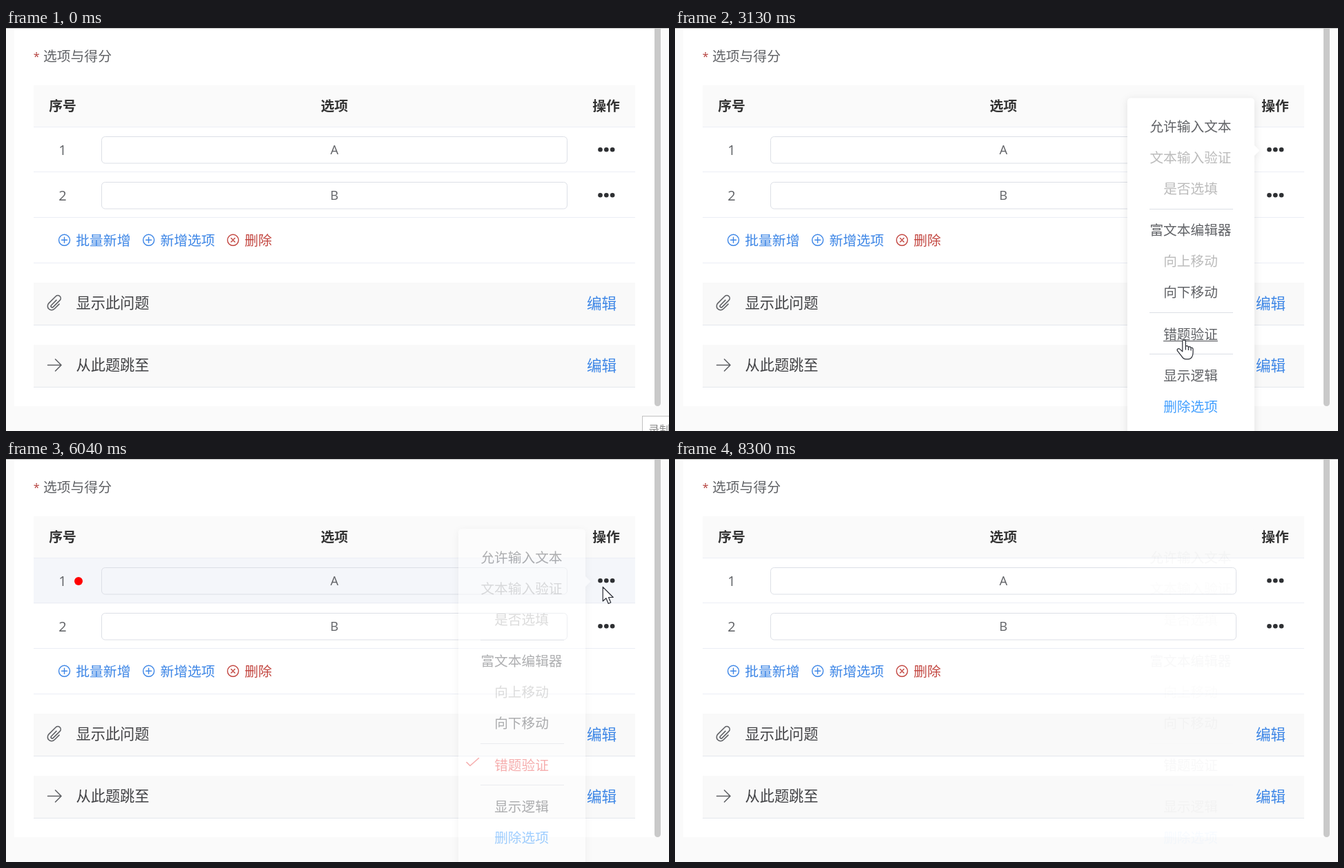
Recreate the animation shown at these times as an HTML page. Size 960 by 584 pixels, loop 8970 ms.

```html
<!DOCTYPE html>
<html lang="zh-CN">
<head>
<meta charset="utf-8">
<title>选项与得分</title>
<style>
  html, body { margin: 0; width: 100%; height: 100%; overflow: hidden; background: #fafafa; }
  svg { display: block; }
  text { font-family: "Noto Sans CJK SC", "Noto Sans CJK", sans-serif; }
  .latin { font-family: "Open Sans", "Noto Sans", sans-serif; }
  .middle { text-anchor: middle; }
  .line { fill: none; stroke-linecap: round; stroke-linejoin: round; }
  .pointer { fill: #fff; stroke: #2b2e36; stroke-width: 1.2; stroke-linejoin: round; }
  .panel { filter: drop-shadow(0 2px 6px rgba(0, 0, 0, .1)); }
</style>
</head>
<body>
<svg id="stage" width="960" height="584" viewBox="0 0 960 584"></svg>
<script>
const LOOP = 8970, STEP = 70, TINT_FADE = 150, MENU_FADE = 280;
const BLUE = '#3d86e6', RED = '#c2453f', INK = '#606266', CHECKED = '#ee5f5f';
const stage = document.getElementById('stage');

function add(parent, tag, attrs, content) {
  const el = document.createElementNS('http://www.w3.org/2000/svg', tag);
  for (const key in attrs) el.setAttribute(key, attrs[key]);
  if (content) el.textContent = content;
  return parent.appendChild(el);
}
const rect = (parent, x, y, width, height, fill, more) =>
  add(parent, 'rect', { x, y, width, height, fill, ...more });
const path = (parent, d, stroke, width = 1.5, more) =>
  add(parent, 'path', { d, stroke, 'stroke-width': width, class: 'line', ...more });
const circle = (parent, cx, cy, r, fill, more) =>
  add(parent, 'circle', { cx, cy, r, fill, ...more });
// Places a line of text by its vertical centre.
const label = (parent, x, cy, content, size, fill, more) =>
  add(parent, 'text', { x, y: cy + size * .37, 'font-size': size, fill, ...more }, content);
const show = (el, visible) => el.setAttribute('visibility', visible ? 'visible' : 'hidden');

// Page and table
rect(stage, 12, 0, 927, 548, '#fff');
rect(stage, 939, -10, 9, 558, '#c9c9c9', { rx: 4.5 });
rect(stage, 0, 0, 960, 1, '#c4c4c4');
label(stage, 39.8, 41, '*', 16, '#b5423e', { class: 'latin' });
label(stage, 54, 41, '选项与得分', 19.8, INK);

rect(stage, 40, 83, 871, 60, '#fafafa');
for (const [name, x] of [['序号', 82], ['选项', 475.5], ['操作', 869]])
  label(stage, x, 113, name, 19.8, '#333', { class: 'middle', 'font-weight': 700 });

const rows = ['A', 'B'].map((option, i) => {
  const top = 144 + 66 * i;
  const tint = rect(stage, 40, top, 871, 65.5, '#f4f6fa', { opacity: 0 });
  rect(stage, 138.5, top + 13.5, 674, 38.5, 'none', { rx: 5, stroke: '#dcdfe6' });
  label(stage, 82, top + 32.3, i + 1, 20, INK, { class: 'latin middle' });
  label(stage, 475.5, top + 32, option, 18.3, INK, { class: 'latin middle' });
  for (const side of [-1, 0, 1]) circle(stage, 869.3 + 8.8 * side, top + 32.2, 3.3, '#2e3033');
  return { top, tint };
});
for (let i = 0; i < 4; i++) rect(stage, 40, Math.floor(143 + 65.8 * i), 871, 1, '#ebeef5');
const redDot = circle(stage, 105, 177, 6, '#f00');

['批量新增', '新增选项', '删除'].forEach((name, i) => {
  const x = 84.5 + 122.1 * i, color = i < 2 ? BLUE : RED;
  const cross = i < 2 ? 'm-4 0h8m-4-4v8' : 'm-2.7-2.7 5.4 5.4m0-5.4-5.4 5.4';
  circle(stage, x, 307.3, 8, 'none', { stroke: color, 'stroke-width': 1.4 });
  path(stage, `M${x} 307.3${cross}`, color, 1.4);
  label(stage, x + 16.8, 308, name, 19.8, color);
});

['显示此问题', '从此题跳至'].forEach((name, i) => {
  const top = 369 + 90 * i;
  rect(stage, 40, top, 871, 61, '#f9f9f9');
  rect(stage, 40, top + 61, 871, 1, '#e4e7ed');
  label(stage, 101.5, top + 29.5, name, 21.2, '#404144');
  label(stage, 841, top + 30.5, '编辑', 21.6, BLUE);
});
path(stage, 'M5-3V5.5a5 5 0 0 1-10 0V-7a3.6 3.6 0 0 1 7.2 0V5a1.6 1.6 0 0 1-3.2 0V-4', INK, 1.4,
  { transform: 'translate(70.5 398.5) rotate(45) scale(1.15)' });
path(stage, 'M60.5 488.5H80M71.5 480 80 488.5 71.5 497', INK, 1.6);

const corner = add(stage, 'g', {});
rect(corner, 921.5, 562.5, 60, 40, '#fff', { stroke: '#c2c2c2' });
label(corner, 930.5, 582, '录制', 15.5, '#888');

// Popover menu
const menu = add(stage, 'g', {});
const panel = add(menu, 'g', { class: 'panel' });
rect(panel, 655, 101.5, 184, 520, '#fff', { rx: 5 });
add(panel, 'path', { d: 'M838 169 846.5 177.5 838 186Z', fill: '#fff' });

const groups = ['允许输入文本 文本输入验证 是否选填', '富文本编辑器 向上移动 向下移动', '错题验证', '显示逻辑 删除选项'];
const disabled = ['文本输入验证', '是否选填', '向上移动'];
const items = {};
let itemY = 143;
groups.forEach((group, i) => {
  if (i) {
    rect(menu, 687, Math.round(itemY - 16.5), 121, 1, '#dcdfe6');
    itemY += 15.1;
  }
  for (const name of group.split(' ')) {
    const enabled = !disabled.includes(name), half = name.length * 9.85;
    const fill = !enabled ? '#bbb' : name === '删除选项' ? '#409eff' : INK;
    const el = add(menu, 'g', { fill });
    add(el, 'text', { x: 746.5, y: itemY + 7.3, 'font-size': 19.7, class: 'middle' }, name);
    const underline = add(el, 'rect', { x: 746.5 - half, y: itemY + 9.8, width: half * 2, height: 1.2 });
    items[name] = { y: itemY, half, enabled, el, underline };
    itemY += 45;
  }
});
const check = path(menu, 'M667 439.5 672 444.5 684.5 433.5', CHECKED, 1.6);

// Pointers
const arrow = add(stage, 'path', {
  class: 'pointer', d: 'M.5 .5V21L5.2 16.7 8.5 24.5 12 23 8.8 15.5H15.5Z'
});
const hand = add(stage, 'path', {
  class: 'pointer',
  d: 'M-2.3 2.8C-2.3-.3 2.3-.3 2.3 2.8V10C3 8.4 6 8.8 6.3 11 7.5 9.6 9.7 10.2 10 12 11.5 11 13 12.2 13 14V19' +
    'C13 24 10.5 28.3 6 28.3H2.5C0 28.3-2 26.5-3.5 24L-9.5 16.3C-11 13.5-8 12-6 13.8L-2.3 17.3Z' +
    'M2.3 10v5M6.3 11v4.5M10 12v4'
});

// Each move bends from the last resting place towards a new one and slows down.
const entry = [921, 590];
const moves = [
  { start: 390, end: 1340, bend: [890, 300], to: [858, 171] },
  { start: 1340, end: 1810, bend: [859, 173], to: [861, 173] },
  { start: 1940, end: 3130, bend: [760, 62], to: [737, 453] },
  { start: 3990, end: 4830, bend: [402, 326], to: [120, 182], power: 3 },
  { start: 5020, end: 6040, bend: [500, 190], to: [864, 185] },
  { start: 6380, end: 7000, bend: [790, 230], to: [747, 430] },
  { start: 7670, end: 8160, bend: [450, 400], to: [425, 590] }
];
const menuTimes = [{ open: 1060, close: 4270 }, { open: 5880, close: 7990 }];

const clamp = v => Math.max(0, Math.min(1, v));
const held = t => Math.floor(t / STEP + .001) * STEP;

function pointerAt(t) {
  const i = moves.findLastIndex(move => held(t) >= move.start);
  if (i < 0 || t >= moves.at(-1).end) return null;
  const { start, end, bend, to, power = 2 } = moves[i];
  const from = i ? moves[i - 1].to : entry;
  const u = 1 - (1 - clamp((held(t) - start) / (end - start))) ** power;
  return to.map((v, k) => (1 - u) ** 2 * from[k] + 2 * u * (1 - u) * bend[k] + u * u * v);
}

const menuOpacity = t => menuTimes.reduce((sum, { open, close }) =>
  sum + clamp((held(t) - open) / MENU_FADE) - clamp((held(t) - close) / MENU_FADE), 0);

function overRow(t, top) {
  const pointer = pointerAt(t);
  if (!pointer) return false;
  const [x, y] = pointer;
  const covered = menuOpacity(t) > .5 && x > 655 && x < 839;
  return !covered && x > 40 && x < 911 && y > top && y < top + 66;
}

// The tint fades evenly, so it equals the hovered share of the recent past.
function rowTint(t, top) {
  const samples = 5;
  let hovered = 0;
  for (let i = 0; i < samples; i++) hovered += overRow(t - i * TINT_FADE / samples, top);
  return hovered / samples;
}

function draw(t) {
  const pointer = pointerAt(t), opacity = menuOpacity(t);
  const checked = t >= 3470 && t < 7270;

  show(corner, t < 70);
  show(redDot, t >= 3600 && t < 7340);
  show(check, checked);
  items['错题验证'].el.setAttribute('fill', checked ? CHECKED : INK);
  menu.setAttribute('opacity', opacity);
  for (const { top, tint } of rows) tint.setAttribute('opacity', rowTint(t, top));

  let overItem = false;
  for (const { y, half, enabled, underline } of Object.values(items)) {
    const over = !!pointer && opacity > .9 && enabled &&
      Math.abs(pointer[0] - 746.5) < half && Math.abs(pointer[1] - y) < 21;
    show(underline, over);
    overItem ||= over;
  }
  show(arrow, pointer && !overItem);
  show(hand, overItem);
  if (pointer) for (const el of [arrow, hand]) el.setAttribute('transform', `translate(${pointer})`);
}

const start = performance.now();
function tick() {
  draw((performance.now() - start) % LOOP);
  requestAnimationFrame(tick);
}
tick();
</script>
</body>
</html>
```
